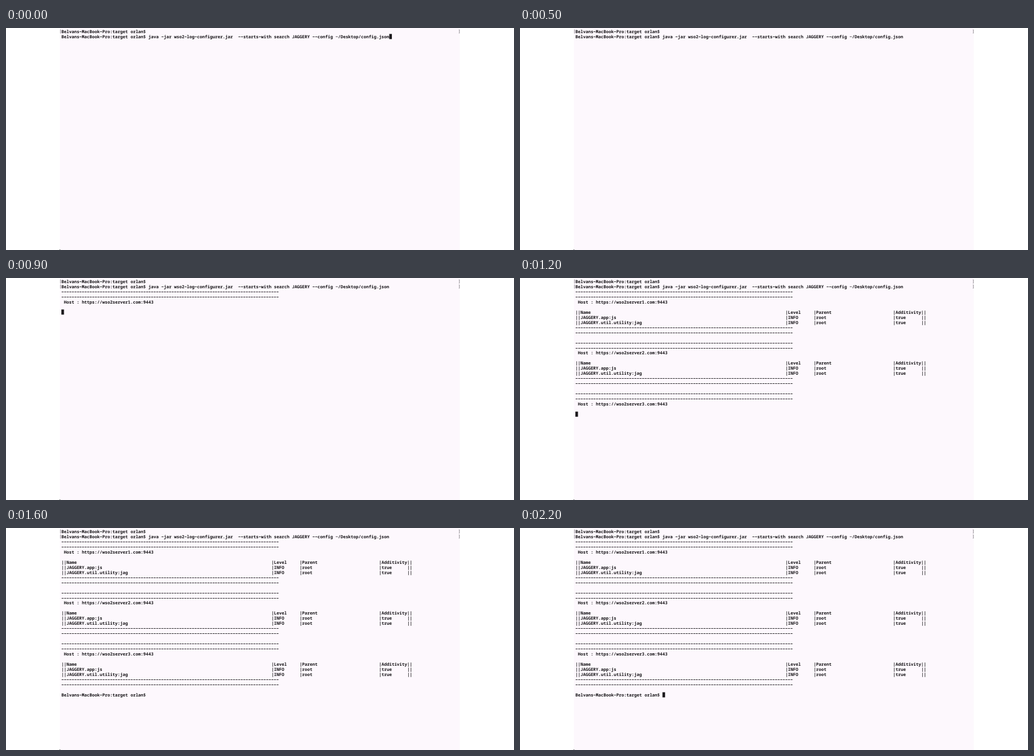
Recreate the animation shown at these times as an HTML page. Size 890 px wide and 390 px high, loop 2300 ms.

```html
<!DOCTYPE html>
<html lang="en">
<head>
<meta charset="utf-8">
<title>Terminal</title>
<style>
html, body { margin: 0; width: 100%; height: 100%; overflow: hidden; background: #fff; }
svg { display: block; }
text {
  font: 600 7.48px "Noto Sans Mono", "DejaVu Sans Mono", monospace;
  fill: #161417;
  text-rendering: geometricPrecision;
}
path { fill: none; stroke: #77717a; stroke-width: .8; }
</style>
</head>
<body>
<svg id="stage" width="890" height="390" viewBox="0 0 890 390">
  <rect x="94.5" width="700.5" height="390" fill="#fdf8fd"/>
  <rect x="94" y="389" width="1" height="1" fill="#222"/>
</svg>
<script>
const LEFT = 97, COL = 4.488, ROW = 8.97, LOOP = 2300;
const stage = document.getElementById("stage");
const prompt = "Belvans-MacBook-Pro:target orlan$ ";
const command = "java -jar wso2-log-configurer.jar  --starts-with search JAGGERY --config ~/Desktop/config.json";
const rule = "-".repeat(85);

const tableRow = (name, level, parent, additivity) =>
  ("||" + name).padEnd(82) + ("|" + level).padEnd(11) +
  ("|" + parent).padEnd(31) + ("|" + additivity).padEnd(11) + "||";

const report = n => [
  rule, rule, ` Host : https://wso2server${n}.com:9443`, "",
  tableRow("Name", "Level", "Parent", "Additivity"),
  tableRow("JAGGERY.app:js", "INFO", "root", "true"),
  tableRow("JAGGERY.util.utility:jag", "INFO", "root", "true"),
  rule, rule, ""
];

const lines = [prompt, prompt + command, ...[1, 2, 3].flatMap(report), prompt];

function add(parent, tag, attrs, content = "") {
  const el = document.createElementNS("http://www.w3.org/2000/svg", tag);
  for (const key in attrs) el.setAttribute(key, attrs[key]);
  el.textContent = content;
  return parent.appendChild(el);
}

// Each word starts on its own column of the character grid.
const rows = lines.map((line, r) => {
  const group = add(stage, "g", {});
  for (const word of line.matchAll(/\S+/g)) {
    add(group, "text", { x: LEFT + word.index * COL, y: 8.9 + r * ROW },
      word[0].replaceAll("-", "\u2212"));
  }
  return group;
});

// Margin brackets beside each entered prompt.
const marks = [0, 1].map(r => {
  const y = 3 + r * ROW;
  return add(stage, "path", { d: `M96 ${y}h-.6v6.2h.6M793.6 ${y}h.7v6.2h-.7` });
});

const cursor = add(stage, "rect", { width: 4.6, height: 9, fill: "#1b191c" });

// When the cursor moves, and to which row; everything above it is printed.
const moves = [
  { at: -200, row: 1 },
  { at: 800, row: 2 },
  { at: 900, row: 6 },
  { at: 1200, row: 26 },
  { at: 1300, row: 32 }
];

const show = (el, on) => { el.style.visibility = on ? "visible" : "hidden"; };

// The cursor stays lit for 300 ms after a move, then toggles every 200 ms.
const lit = age => age < 300 || Math.floor((age - 300) / 200) % 2 === 1;

const start = performance.now();

function draw(now) {
  const t = Math.max(0, now - start) % LOOP;
  const { at, row } = moves.findLast(m => m.at <= t);
  const typing = lines[row].startsWith(prompt);
  rows.forEach((el, i) => show(el, i < row || (typing && i === row)));
  marks.forEach((el, i) => show(el, i < row));
  show(cursor, lit(t - at));
  cursor.setAttribute("x", LEFT + (typing ? lines[row].length : 0) * COL);
  cursor.setAttribute("y", 1.5 + row * ROW);
  requestAnimationFrame(draw);
}
draw(start);
</script>
</body>
</html>
```
